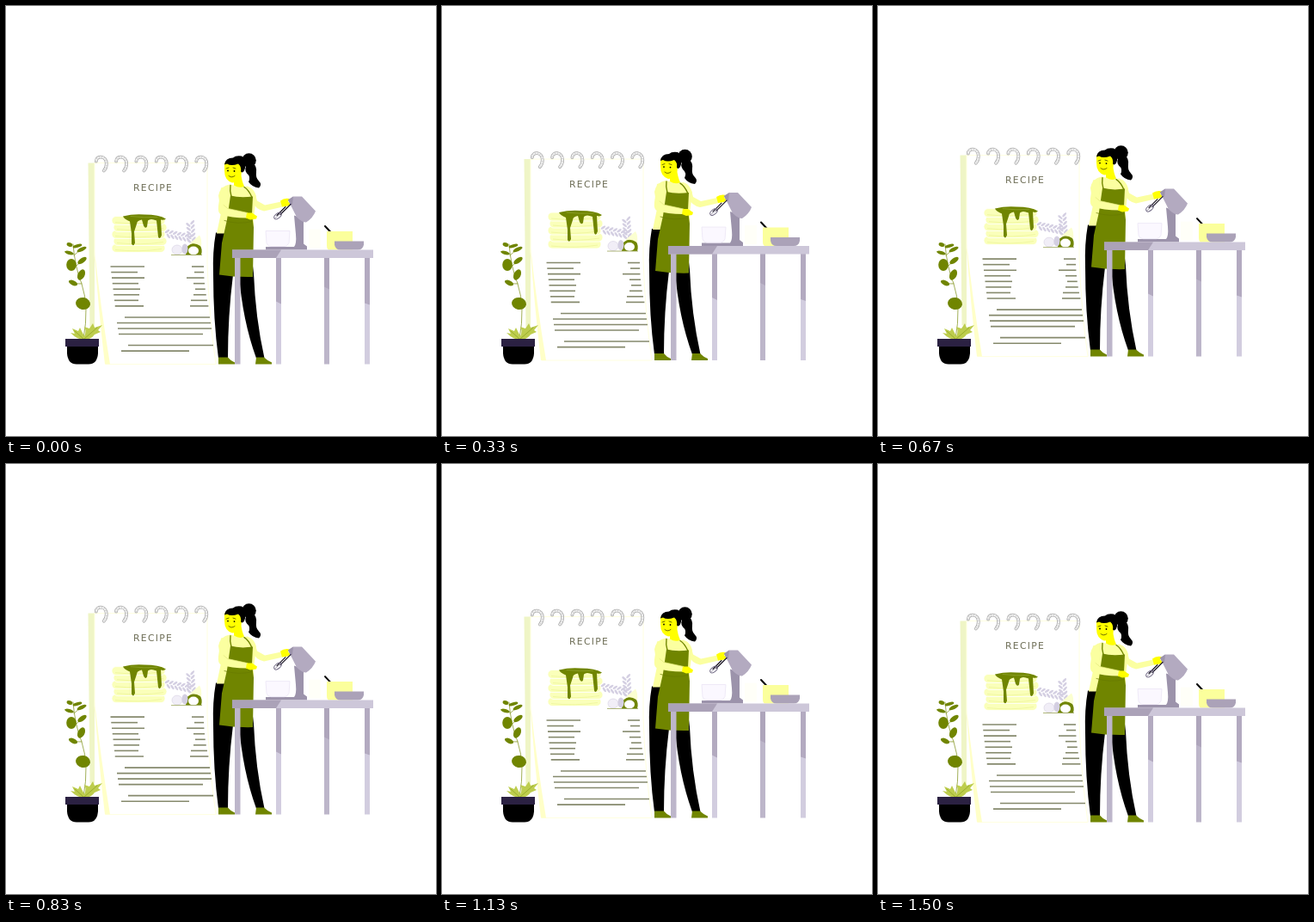
These frames come from a looping animation (500 px wide and 500 px high, 1540 ms). An HTML page:

```html
<!DOCTYPE html>
<html lang="en">
<head>
<meta charset="utf-8">
<title>Recipe</title>
<style>
  html, body { margin: 0; width: 100%; height: 100%; overflow: hidden; background: #fff; }
  svg { display: block; width: 100%; height: 100%; }
  .olive { fill: #708500; }
  .shirt { fill: #fbffa0; }
  .skin { fill: #ff0; }
  .mid { fill: #b3aac0; }
  .pale { fill: #d2cddf; }
  .dark { fill: #9c93ab; }
  .line { fill: none; stroke-linecap: round; stroke-linejoin: round; }
</style>
</head>
<body>
<svg viewBox="0 0 500 500">
  <g id="scene">
    <g id="page">
      <path d="M95.500 182H103V380H97.500Z" fill="#eff5c6"/>
      <path d="M103 182H234V300Q236 360 244 416H116Q109 350 103 290Z" fill="#fff" stroke="#ffffe0"/>
      <path d="M103 285Q107 350 115 416H121Q110 350 103 285Z" fill="#ffffc8"/>
      <g id="rings" class="line"></g>
      <text x="148" y="214.800" font-family="DejaVu Sans, sans-serif" font-size="10.800" letter-spacing="1.3" fill="#6f6f58">RECIPE</text>
      <g id="writing" stroke="#85896c" stroke-width="1.6"></g>
    </g>

    <g id="pancakes">
      <g id="layers" fill="#faffba" stroke="#fff" stroke-width=".8"></g>
      <path class="olive" d="M136 244Q148 241 161 242Q178 242 186 247Q184 249 180 248L181 266Q179 272 177 268L175 249Q168 246 165 249L164 256Q162 259 160 255L158 248Q152 249 152 253L149 262L150 275Q148 280 146 276L146 264L144 250Q137 247 136 244Z"/>
      <path d="M145 244Q160 246 176 245" class="line" stroke="#8fa32c" stroke-width=".8"/>
    </g>
    <g id="sprigs" fill="#d4cfe2"></g>
    <path class="olive" d="M210 280Q217 273 225 277Q229 282 227 289H209Z"/>
    <path d="M213 276Q218 272 225 266Q228 271 227 279Q220 274 213 276Z" fill="#fbffd0"/>
    <ellipse cx="218" cy="284" rx="6" ry="5" fill="#fff"/>
    <ellipse cx="199" cy="283" rx="6" ry="5.5" fill="#f1eef7" stroke="#ddd8e8" stroke-width=".8"/>
    <ellipse cx="208" cy="282" rx="3.5" ry="6" fill="#d4cfe2"/>
    <path d="M192 289H228" stroke="#9aa45a" stroke-width=".8"/>

    <g id="cook">
      <path d="M244 263Q240 285 241 312Q241 365 247 409H258Q258 360 264 312H271Q275 365 291 409H300.500Q290 362 288 310L282 262Z"/>
      <path class="olive" d="M247 408H258Q261 412 266 414V416H247ZM291 408H300Q304 412 309 414V416H290Z"/>
      <circle cx="282.500" cy="179" r="8.300"/>
      <path d="M281 183Q276 189 280 194Q285 198 282 204Q286 210 294 211Q298 207 294 203Q290 199 291 193Q292 186 287 182Z"/>
      <path class="shirt" d="M260 207Q272 210 281 209Q289 213 291 221L288 246V264H245L250 240L247 220Q249 209 260 207Z"/>
      <path class="shirt" d="M283 210Q289 212 292 226L301 231L320 227L322 233L300 238Q290 236 286 226Z"/>
      <path class="skin" d="M319 226Q324 222 331 224L328 227L331 229L328 232L321 233Z"/>
      <path class="skin" d="M265 198L273 193Q274 203 277 209Q272 212 265 208Z"/>
      <path class="skin" d="M254 182Q264 180 273 184Q275 190 273 197Q270 205 263 205Q254 202 254 191Z"/>
      <path d="M254 184Q255 176 264 176Q267 173 274 174Q281 178 278 188Q276 195 273 192Q274 186 270 183Q262 186 257 183Z"/>
      <path d="M256 188.500L259 187.500M264 187.500L267 188.500M259 197Q262 200 266 197" class="line" stroke="#5b5b00" stroke-width=".9"/>
      <circle cx="258" cy="191" r=".9"/><circle cx="265.500" cy="191.500" r=".9"/>
      <path class="olive" d="M261 220Q272 223 287 221L286 242L288 257L287 314.500Q266 315 248 312L251 275L257 248Z"/>
      <path d="M262 221Q260 214 261 208M286 222Q282 213 277 210" class="line" stroke="#708500" stroke-width="1.4"/>
      <path d="M254 249Q270 254 286 250" class="line" stroke="#677a00" stroke-width=".7"/>
      <path class="shirt" d="M250 211Q258 208 259 218L258 235L281 240L280 246Q262 246 250 242Q246 240 247 232Z"/>
      <path d="M258 235L253 231M258 235L281 240" class="line" stroke="#e2e97c" stroke-width=".7"/>
      <path class="skin" d="M280 240L286 240L292 244L291 247L284 248L279 246Z"/>
    </g>

    <g id="mixer">
      <path class="dark" d="M335 243L346 247V276L350 279V283H302V279.500H335Q338 276 337 265Z"/>
      <path class="mid" d="M328 225L334 221H344L360 238Q357 246 349 251Q344 251 338 245Z"/>
      <path class="dark" d="M328 225L334 221L333 230L331 231Z"/>
      <path d="M302 261H330L329 275Q327 279 324 279H308Q304 279 303 275Z" fill="#fbf8ff" stroke="#eee8f6" stroke-width=".9"/>
      <path d="M331 230L319 242M325 233L315 243" class="line" stroke="#16121f" stroke-width="1.1"/>
      <ellipse cx="316" cy="243.500" rx="5" ry="2.800" transform="rotate(-40 316 243.500)" fill="none" stroke="#77708a"/>
      <path d="M312 247L320 240" stroke="#77708a" stroke-width=".7"/>
    </g>

    <g id="bowls">
      <path d="M352 259H366V281H352Z" fill="#fffff8"/>
      <path d="M371 255.500L378 263" class="line" stroke="#000" stroke-width="2"/>
      <path d="M373 261.500H403V283H375Q373 282 373 278Z" fill="#fbff9c"/>
      <path d="M382 273H416V277Q415 283 409 283H389Q383 283 382 277Z" fill="#aba2b8"/>
    </g>

    <g id="table">
      <path d="M266 292H272.500V416H266ZM370 292H376V416H370Z" fill="#bdb6ca"/>
      <path class="pale" d="M314 292H320V416H314ZM417 292H423V416H417Z"/>
      <path class="mid" d="M314 292H320V346L314 343ZM417 292H423V347L417 345Z"/>
      <path d="M370 292H376V329L370 326Z" fill="#aea5bb"/>
      <path d="M263 283H427V292.500H263Z" fill="#cdc7d9"/>
      <path d="M263 283H320L314 292.500H263Z" fill="#aba2b8"/>
    </g>
  </g>

  <g id="plant">
    <path d="M90 387Q97 350 88 323Q80 303 78 277M88 323Q84 324 79 321M85 315L88 310M81 303L89 295M79 290L86 284" class="line" stroke="#8a9b2c" stroke-width=".8"/>
    <g id="leaves" class="olive"></g>
    <path d="M90 388Q83 388 75 380L80 381L77 375L84 378L86 374L91 384Q94 378 91 373L97 375L101 369L103 374L112 371L107 377L110 379L103 382Q99 388 90 388Z" fill="#bdcd4e"/>
    <path d="M90 387L80 378M91 387L106 374" class="line" stroke="#91a624" stroke-width=".8"/>
    <path d="M71 396H107V404Q106 416.500 96 416.500H82Q72 416.500 71 404Z"/>
    <path d="M69 387H108V396H69Z" fill="#2b2142"/>
  </g>
</svg>
<script>
const $ = id => document.getElementById(id);
const fill = (id, items, draw) => { $(id).innerHTML = items.map(draw).join(''); };
const leaf = ([x, y, rx, ry, turn]) =>
  `<ellipse cx="${x}" cy="${y}" rx="${rx}" ry="${ry}" transform="rotate(${turn} ${x} ${y})"/>`;

fill('rings', [0, 1, 2, 3, 4, 5], i => {
  const d = `M${104.8 + i * 23.3} 180c0-7 12-7 12 3c0 4-1 6-3 8`;
  return `<path d="${d}" stroke="#aaa" stroke-width="3.800"/><path d="${d}" stroke="#f0f0f0" stroke-width="2.300"/>
    <path d="${d}" stroke="#bbb" stroke-width="2" stroke-dasharray=".5 2.500" stroke-linecap="butt"/>`;
});

// Paired short lines beside the picture, then full-width ones.
const leftEnds = [161, 153, 161, 154, 156, 155, 154, 160];
const rightStarts = [216, 219, 210, 218, 220, 218, 215, 214];
const rows = leftEnds.flatMap((end, i) => {
  const y = 302.5 + i * 6.55;
  return [[121.5 + i * .75, end, y], [rightStarts[i], 230 + i * i * .11, y]];
}).concat([[138, 237, 361.5], [129, 238, 368], [130, 239, 374.5], [131, 229, 381], [142, 241, 394], [134, 213, 400.6]]);
fill('writing', rows, ([x1, x2, y]) => `<path d="M${x1} ${y}H${x2}"/>`);

fill('layers', [4, 3, 2, 1, 0], i => {
  const x = 123 + i % 2 * 2, y = 244 + i * 8;
  return `<rect x="${x}" y="${y}" width="62" height="10" rx="5"/>
    <path d="M${x + 4} ${y + 7}q28 3 54 -1" fill="none" stroke="#eef59a"/>`;
});

const sprig = (x, y, dx, dy, n) => Array.from({ length: n }, (_, i) => {
  const turn = Math.atan2(dy, dx) * 180 / Math.PI, side = i % 2 ? 1 : -1;
  const len = Math.hypot(dx, dy);
  return [x + dx * i / n - dy / len * side * 2.5, y + dy * i / n + dx / len * side * 2.5, 3.2, 1.3, turn + side * 45];
});
fill('sprigs', [...sprig(187, 264, 30, 6, 13), ...sprig(216, 273, -2, -24, 10)], leaf);

fill('leaves', [
  [89.5, 346, 8.5, 7, 10], [78, 322, 5.5, 2.7, 25], [87.5, 312.5, 4, 6.5, 25],
  [76, 301, 5.8, 7, 0], [88.5, 296, 6, 2.8, -35], [73.5, 287, 5.5, 2, 15],
  [88, 283, 6, 2.2, -25], [74, 277.5, 3.5, 2.3, 20], [83, 279, 5.5, 1.9, -15]
], leaf);

// The scene floats up 10 px and back in 36 even steps, then rests for one.
const LOOP = 1540, STEPS = 36, STEP = 1500 / STEPS, RISE = 10, BASE = .5;
function frame(now) {
  const step = Math.min(STEPS, Math.floor((now % LOOP + 5) / STEP));
  const lift = RISE * (1 - Math.abs(1 - 2 * step / STEPS));
  $('scene').setAttribute('transform', `translate(0 ${BASE - lift})`);
  requestAnimationFrame(frame);
}
frame(performance.now());
</script>
</body>
</html>
```
